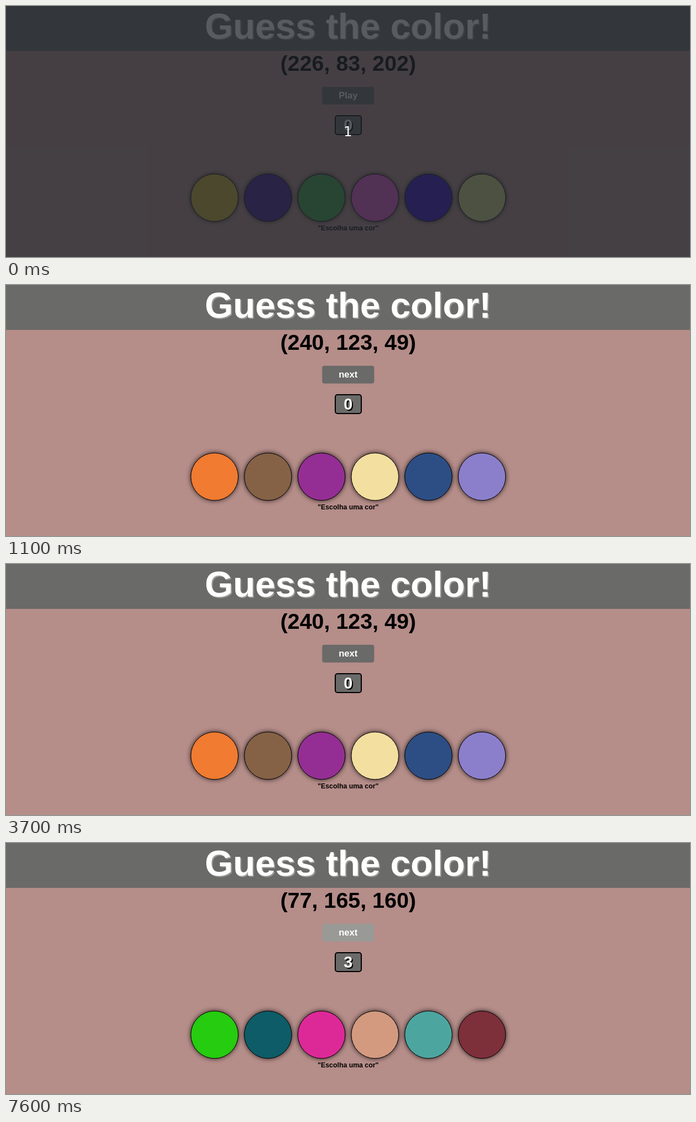
Write an HTML page that moves like this. It is 1236 px wide and 453 px high and loops after 8 s.

```html
<!DOCTYPE html>
<html lang="en">
<head>
<meta charset="utf-8">
<title>Guess the color!</title>
<style>
  html, body { margin: 0; width: 100%; height: 100%; overflow: hidden; background: #b58d89; }
  svg { display: block; width: 100%; height: 100%; }
  text { font-family: "Liberation Sans", Arial, sans-serif; font-weight: bold; text-anchor: middle; }
  .light { fill: #fff; }
  #title { font-size: 65.6px; filter: drop-shadow(2px 2px 0 #999996); }
  #rgb { font-size: 39.4px; }
  #label { font-size: 16.6px; }
  #score { font-size: 28.8px; filter: drop-shadow(2px 2px 0 #000); }
  #message { font-size: 12.3px; }
  #circles circle { stroke: #000; filter: drop-shadow(0 0 4px rgba(0, 0, 0, .8)); }
  #countdown text { font: 24px "DejaVu Sans", sans-serif; }
</style>
</head>
<body>
<svg viewBox="0 0 1236 453">
  <rect width="1236" height="453" fill="#b58d89"/>
  <rect width="1236" height="81" fill="#6a6a68"/>
  <text id="title" class="light" x="618" y="59">Guess the color!</text>
  <text id="rgb" x="618.3" y="117"></text>
  <rect id="button" x="571.3" y="145.7" width="94" height="32" rx="4"/>
  <text id="label" class="light" x="618.3" y="167"></text>
  <rect x="595" y="198" width="47" height="34" rx="4" fill="#6a6a68" stroke="#000" stroke-width="2"/>
  <text id="score" class="light" x="618.3" y="225"></text>
  <g id="circles"></g>
  <text id="message" x="618.3"></text>
  <g id="countdown">
    <rect width="1236" height="453" fill="rgb(32, 38, 44)" fill-opacity=".75"/>
    <text class="light" x="618" y="235">1</text>
  </g>
</svg>
<script>
const LOOP = 8000;
const rounds = [
  { start: 0, rgb: "(226, 83, 202)", label: "Play",
    colors: ["#cfb135", "#421b94", "#3e9e46", "#e253ca", "#330fbf", "#d1d480"] },
  { start: 800, rgb: "(240, 123, 49)", label: "next",
    colors: ["#f07b31", "#856246", "#942e94", "#f3df9f", "#2d4e84", "#8b7fcc"] },
  { start: 7600, rgb: "(77, 165, 160)", label: "next",
    colors: ["#25cc0f", "#0d5c67", "#dd2998", "#d39a80", "#4da5a0", "#7d2f3a"] },
];
const hovers = [[100, 1100], [3500, 3700], [7100, LOOP]];
const ANSWERED = 4800;

const byId = id => document.getElementById(id);
const setText = (id, value) => {
  if (byId(id).textContent !== value) byId(id).textContent = value;
};
const setAttributes = (node, attributes) => {
  for (const name in attributes) node.setAttribute(name, attributes[name]);
};

const circles = rounds[0].colors.map(() =>
  byId("circles").appendChild(document.createElementNS("http://www.w3.org/2000/svg", "circle")));

function draw(time) {
  const round = rounds.findLast(r => time >= r.start);
  const correct = time >= ANSWERED && time < rounds[2].start;
  const hovered = hovers.some(([from, to]) => time >= from && time < to);

  setText("rgb", round.rgb);
  setText("label", round.label);
  setText("score", time >= ANSWERED ? "3" : "0");
  setText("message", correct ? "Acertou!" : '"Escolha uma cor"');
  setAttributes(byId("message"), { y: correct ? 412 : 405 });
  setAttributes(byId("button"), { fill: hovered ? "#999996" : "#6a6a68" });
  setAttributes(byId("countdown"), { visibility: time < 100 ? "visible" : "hidden" });

  // The chosen circle grows and pushes the others aside.
  circles.forEach((circle, i) => {
    const chosen = correct && i === 0;
    setAttributes(circle, {
      cx: 376.8 + i * 96.65 + (correct && !chosen ? 3.3 : 0),
      cy: chosen ? 349.3 : 346,
      r: chosen ? 46.1 : 42.8,
      fill: round.colors[i],
    });
  });
}

const begin = performance.now();
function tick() {
  draw((performance.now() - begin) % LOOP);
  requestAnimationFrame(tick);
}
tick();
</script>
</body>
</html>
```
